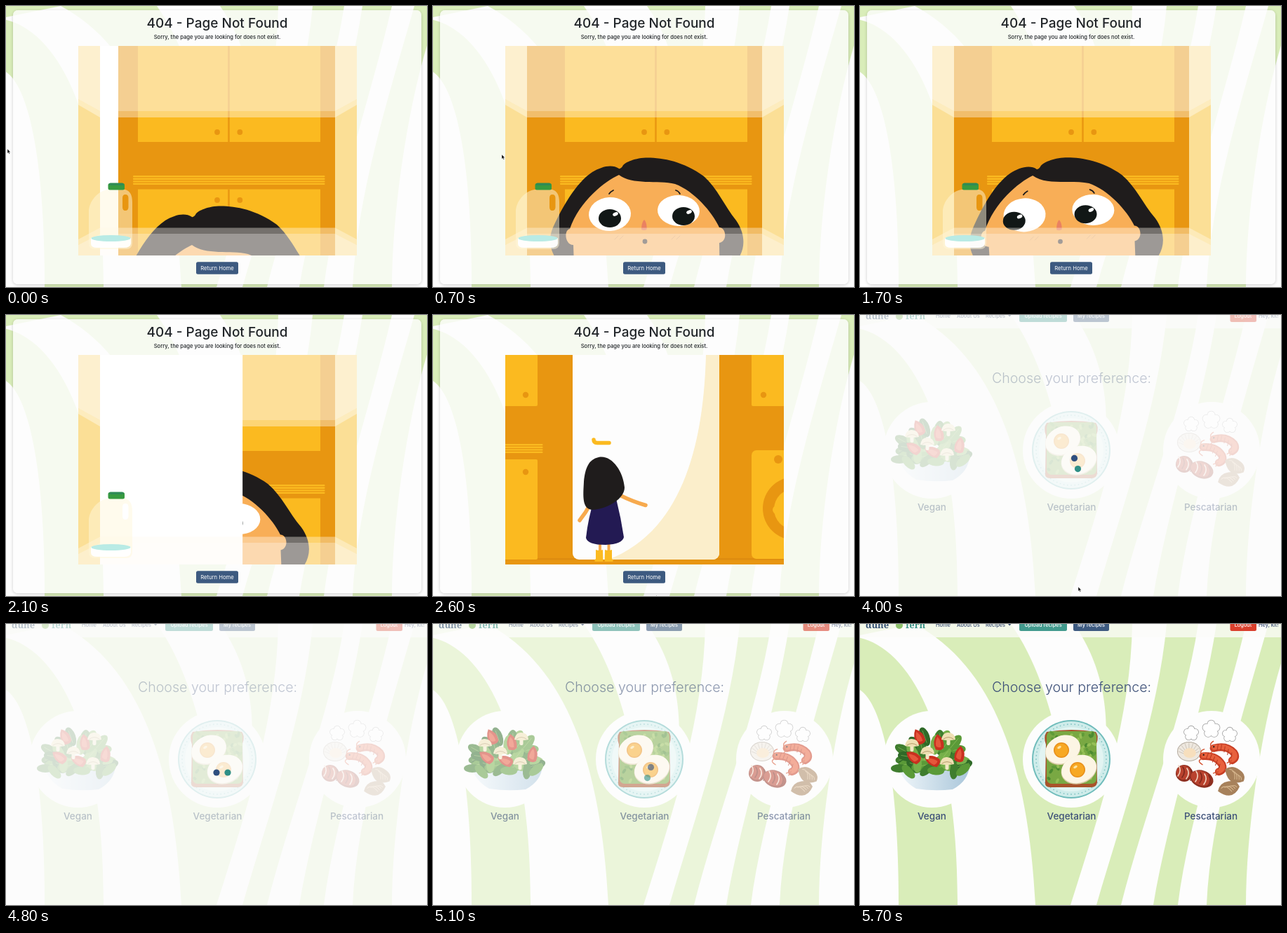
Recreate the animation shown at these times as an HTML page with a canvas. Size 600 by 401 pixels, loop 5.8 s.

```html
<!DOCTYPE html>
<html lang="en">
<head>
<meta charset="utf-8">
<title>404 - Page Not Found</title>
<style>
html, body { margin: 0; width: 100%; height: 100%; overflow: hidden; background: #fdfdfd; }
canvas, svg { position: absolute; left: 0; top: 0; width: 600px; height: 401px; }
text { font-family: Inter, "Open Sans", sans-serif; }
.mid { text-anchor: middle; }
.nav text { font-size: 7.4px; font-weight: 500; }
.nav .logo { font: 700 13px "Noto Serif", serif; }
</style>
</head>
<body>
<canvas id="stage" width="600" height="401"></canvas>
<svg viewBox="0 0 600 401">
  <g id="lost" fill="#212529" class="mid">
    <text x="301" y="31" font-size="19" font-weight="500">404 - Page Not Found</text>
    <text x="301" y="47.3" font-size="7.6" font-weight="500">Sorry, the page you are looking for does not exist.</text>
    <rect id="button" x="271" y="365.3" width="60" height="17.5" rx="2.5"/>
    <text x="301" y="376.8" font-size="7.7" fill="#fff">Return Home</text>
  </g>
  <g id="prefs" fill="#3d5078">
    <g class="nav">
      <text class="logo" x="8" y="6" fill="#334f73">dune</text>
      <circle cx="56" cy="2" r="5" fill="#8cbf6a"/>
      <text class="logo" x="65" y="6" fill="#3c9488">fern</text>
      <text x="108" y="4.3">Home</text>
      <text x="138" y="4.3">About Us</text>
      <text x="179" y="4.3">Recipes</text>
      <path d="M211 0h4.4l-2.2 2.4z"/>
      <rect x="227" y="-8" width="68" height="18" rx="2.5" fill="#429a8d"/>
      <rect x="304" y="-8" width="51" height="18" rx="2.5" fill="#3d5a80"/>
      <rect x="527.5" y="-8" width="37.5" height="18" rx="2.5" fill="#d93f2c"/>
      <g fill="#fff" class="mid">
        <text x="261" y="4.3">Upload recipes</text>
        <text x="329.5" y="4.3">My recipes</text>
        <text x="546" y="4.3">Logout</text>
      </g>
      <text x="568" y="4.3">Hey, kit!</text>
    </g>
    <g class="mid">
      <text x="301.5" y="97.3" font-size="19.6" font-weight="300">Choose your preference:</text>
      <g font-size="13.5" font-weight="500">
        <text x="102.5" y="279">Vegan</text>
        <text x="301.5" y="279">Vegetarian</text>
        <text x="500" y="279">Pescatarian</text>
      </g>
    </g>
  </g>
  <g id="cursor">
    <path id="arrow" d="M0 0V6.2L1.5 4.9 2.5 7.2 3.5 6.8 2.5 4.6H4.4Z" fill="#000" stroke="#fff" stroke-width=".4"/>
    <path id="hand" d="M-1 0Q0-1 1 0V3Q4 2.5 4.2 4.5 4.2 7 3 8H-1Q-2 6.5-3 5-2.5 4-1 5Z" fill="#fff" stroke="#222" stroke-width=".8"/>
  </g>
</svg>
<script>
const LOOP = 5800, STEP = 100;
const KITCHEN_END = 2300, LEAVE = 3900;
const ORANGE = '#e89611', YELLOW = '#fbba20', SKIN = '#f8ae57', BLACK = '#1f1c1c', GREEN = '#d9edb9', WHITE = '#fdfdfd';
const c = document.getElementById('stage').getContext('2d');
const $ = id => document.getElementById(id);

const clamp = v => Math.max(0, Math.min(1, v));
const ramp = (t, a, b) => clamp((t - a) / (b - a));
const smooth = (t, a, b) => { const k = ramp(t, a, b); return k * k * (3 - 2 * k); };
const mix = (a, b, k) => a + (b - a) * k;
const mixAll = (a, b, k) => a.map((v, i) => mix(v, b[i], k));

function rect(x, y, w, h, color, r = 0) {
  c.fillStyle = color;
  c.beginPath(); c.roundRect(x, y, w, h, r); c.fill();
}
function oval(x, y, rx, ry, color, turn = 0) {
  c.fillStyle = color;
  c.beginPath(); c.ellipse(x, y, rx, ry, turn, 0, 7); c.fill();
}
const dot = (x, y, r, color) => oval(x, y, r, r, color);
function shape(d, color) { c.fillStyle = color; c.fill(new Path2D(d)); }
function line(d, color, w) {
  c.strokeStyle = color; c.lineWidth = w; c.lineCap = c.lineJoin = 'round';
  c.stroke(new Path2D(d));
}
function seeded(seed) {
  return () => (seed = (seed * 16807) % 2147483647) / 2147483647;
}

// Each edge is one cubic curve; white stripes lie between pairs of edges.
const EDGES = [
  [-10, 90, -10, 200, -10, 300, -10, 401],
  [-10, 90, 25, 95, 55, 190, 55, 401],
  [-10, 18, 60, 25, 140, 130, 139, 401],
  [78, 0, 190, 60, 240, 200, 250, 401],
  [215, 0, 250, 50, 270, 110, 290, 200],
  [305, 0, 340, 50, 362, 120, 345, 215],
  [388, 0, 386, 130, 345, 260, 300, 401],
  [437, 0, 425, 130, 375, 270, 337, 401],
  [482, 0, 462, 130, 405, 270, 372, 401],
  [508, 0, 488, 130, 440, 270, 418, 401],
  [550, 0, 520, 130, 470, 270, 453, 401],
  [582, 0, 545, 130, 500, 270, 494, 401],
  [612, 20, 575, 120, 550, 290, 550, 401],
  [640, 20, 640, 120, 640, 290, 640, 401]
];
function stripes() {
  rect(0, 0, 600, 401, GREEN);
  for (let i = 0; i < EDGES.length; i += 2) {
    const a = EDGES[i], b = EDGES[i + 1];
    c.fillStyle = WHITE;
    c.beginPath();
    c.moveTo(a[0], a[1]);
    c.bezierCurveTo(...a.slice(2));
    c.lineTo(b[6], b[7]);
    c.bezierCurveTo(b[4], b[5], b[2], b[3], b[0], b[1]);
    c.fill();
  }
}

function counter(x, y, w) {
  for (let i = 0; i < 4; i++) rect(x, y + i * 3.6, w, 2.3, YELLOW, 1);
}

function head(t) {
  const k = 1 - (1 - ramp(t, 0, 600)) ** 2, look = smooth(t, 900, 1400);
  c.save();
  c.translate(-10 * look, 69 * (1 - k));
  c.translate(300, 356); c.rotate(-0.025 * look); c.translate(-300, -356);
  shape('M265 232C255 225 240 229 227 237C203 253 184 288 171 316C163 335 168 350 176 362V480H434V362C446 345 445 325 432 306C415 285 406 261 386 243C356 221 325 216 303 216.500C285 217.500 272 224 270 229Q267 233 265 232Z', BLACK);
  c.translate(-6 * look, 31 * (1 - k));
  shape('M265 241C245 250 209 278 195 318C186 320 188 341 200 341L205 480H410L408 338C420 336 418 316 408 316C398 294 372 264 345 254C320 248 284 256 265 241Z', SKIN);
  oval(252, 297, 30, 24, '#fff', -0.05);
  oval(350, 292, 30, 22, '#fff', 0.05);
  const left = [252 - 15 * look, 303 + 2 * look], right = [357 - 18 * look, 300 - 2 * look];
  for (const [x, y] of [left, right]) {
    oval(x, y, 16, 13, '#111716');
    oval(x + 8, y - 6, 4, 2.5, '#fff', -0.4);
  }
  line('M251 268Q253 265 257 263', BLACK, 1.8);
  line('M346 263Q350 264 352 268', BLACK, 1.8);
  shape('M301 305C304 308 305 314 304.500 319Q301 321 297 319C297 314 298 308 301 305Z', '#ea8161');
  dot(302, 336, 3.4, '#2c2321');
  line('M259 333L264 328M266 333L271 328M340 333L345 328M347 333L352 328', '#d08a4a', 0.8);
  c.restore();
}

function jug() {
  c.fillStyle = 'rgba(255,247,220,.5)';
  c.fill(new Path2D('M145 262H170C177 264 180 270 180 280V338Q180 347 171 347H127Q118 347 118 338V292C119 278 131 264 145 262ZM170 269Q166 269 166 274V287Q166 292 170 292 174.500 292 174.500 287V274Q174.500 269 170 269Z'), 'evenodd');
  shape('M121 331H178V339Q177 345 168 345H130Q121 345 121 339Z', 'rgba(255,255,255,.95)');
  oval(149.500, 331.500, 28, 4.6, '#b9ebe5');
}
function cap() {
  rect(145.500, 253, 23.5, 9.5, '#379a40', 2.5);
  rect(147, 252.5, 20.5, 3.5, '#2f8b55', 2);
}

function inside(t) {
  rect(103, 57, 397, 299, '#fbdf96');
  rect(134, 57, 335, 299, ORANGE);
  rect(188, 57, 260, 137, YELLOW);
  counter(181, 242, 273.5);
  rect(188, 261.5, 260, 95, YELLOW);
  for (const [y, h] of [[57, 137], [261.5, 95]]) rect(316.3, y, 2.4, h, ORANGE);
  for (const y of [180, 277]) { dot(301, y, 3.9, ORANGE); dot(333.3, y, 3.9, ORANGE); }
  c.save();
  c.beginPath(); c.rect(134, 57, 335, 299); c.clip();
  head(t);
  c.restore();
  const door = t < 1000 ? 26 * (1 - ramp(t, 0, 200)) : 335 * smooth(t, 1900, 2250);
  if (door > 0) rect(134, 57, door, 299, '#fff');
  shape('M103 57H500V133L469 150H134L103 133Z', 'rgba(255,255,255,.54)');
  shape('M103 133L134 150H469L500 133V141L469 159H134L103 141Z', 'rgba(255,255,255,.38)');
  shape('M134 316.500H469L500 333V341L469 325H134L103 341V333Z', 'rgba(255,250,240,.38)');
  shape('M134 325H469L500 341V356H103V341Z', 'rgba(255,252,246,.56)');
  jug();
  cap();
}

// Closed outline of four cubic curves given as 26 numbers.
function blob(p, color) {
  c.fillStyle = color;
  c.beginPath(); c.moveTo(p[0], p[1]);
  for (let i = 2; i < p.length; i += 6) c.bezierCurveTo(...p.slice(i, i + 6));
  c.fill();
}
function arm(p, w) {
  line(`M${p[0]} ${p[1]}Q${p[2]} ${p[3]} ${p[4]} ${p[5]}`, '#f7aa4e', w);
}
const HAIR_DOWN = [236, 203, 254, 199, 271, 222, 273, 246, 273, 262, 250, 276, 228, 278, 212, 278, 214, 258, 215, 238, 217, 218, 222, 206, 236, 203];
const HAIR_UP = [226, 205, 245, 204, 257, 220, 255, 240, 255, 260, 235, 279, 212, 278.5, 192, 276, 184, 262, 187, 248, 190, 232, 202, 208, 226, 205];

function girl(t) {
  const k = smooth(t, 2750, 3250);
  const drop = 5 * k;
  rect(236, 326, 4, 12, '#f7aa4e');
  rect(248.5, 326, 4, 12, '#f7aa4e');
  const boots = 'M232 335Q237 337 242 335L242.500 352H231Q229 350 232 348Z';
  c.save(); c.translate(k, drop * 0.5);
  shape(boots, YELLOW);
  c.translate(487, 0); c.scale(-1, 1);
  shape(boots, YELLOW);
  c.restore();
  arm(mixAll([224, 270, 218, 282, 209, 293], [240, 275, 239, 280, 238, 285], k), 5.5);
  const top = mix(230, 240, k), right = mix(261, 262, k);
  shape(`M${top} 262L${right} 262Q268 290 ${272 + k} ${317 + drop}Q${270 + k} ${327 + drop} 246 ${328 + drop}Q${220 + k} ${328 + drop} ${218 + k} ${318 + drop}Q221 290 ${top} 262Z`, '#231a53');
  arm(mixAll([266, 257, 284, 266, 303, 271.5], [257, 262, 264, 230, 250, 189], k), mix(5.5, 7.5, k));
  blob(mixAll(HAIR_DOWN, HAIR_UP, k), BLACK);
  return k;
}

function outside(t) {
  rect(103, 57, 397, 299, ORANGE);
  rect(103, 347, 397, 2.5, '#de8c10');
  rect(100, 50, 49, 80, YELLOW, 2);
  rect(454, 50, 60, 80, YELLOW, 2);
  counter(100, 184, 56.5);
  rect(100, 206, 49, 143, YELLOW, 2);
  for (const [x, y] of [[132, 114], [132, 224], [471, 114]]) dot(x, y, 4.2, ORANGE);
  rect(454, 193, 60, 155, YELLOW, 7);
  dot(492, 206, 6, ORANGE);
  dot(515, 276, 45, ORANGE);
  dot(515, 277, 29, YELLOW);
  dot(490, 278, 6, YELLOW);
  c.save();
  c.beginPath(); c.roundRect(199, 40, 209, 309, 9); c.clip();
  rect(199, 57, 209, 292, WHITE);
  shape('M389 57C386 170 362 306 250 349H408V57Z', '#fbeecb');
  c.restore();
  const k = girl(t);
  line(`M229 ${178 + k}Q229 ${182.3 + k} 234 ${182.5 + k}L${251 - k} ${182.5 + 4 * k}`, YELLOW, 5.5);
}

function card() {
  c.save();
  c.beginPath(); c.rect(0, 0, 600, 401); c.roundRect(10, 6, 582, 391, 7);
  c.clip('evenodd');
  c.shadowColor = 'rgba(0,0,0,.2)'; c.shadowBlur = 4; c.shadowOffsetY = 1;
  rect(10, 6, 582, 391, WHITE, 7);
  c.restore();
  rect(10, 6, 582, 391, 'rgba(254,254,254,.8)', 7);
}

function lostPage(t) {
  stripes();
  card();
  c.save();
  c.beginPath(); c.rect(103, 57, 397, 299); c.clip();
  (t < KITCHEN_END ? inside : outside)(t);
  c.restore();
}

function salad() {
  const rnd = seeded(41);
  const greens = ['#3f7d2e', '#5a9a38', '#76b04a', '#2f6a28'];
  const bowl = c.createLinearGradient(57, 0, 156, 0);
  bowl.addColorStop(0, '#eef5f9'); bowl.addColorStop(1, '#a9c6da');
  shape('M55 203Q105 214 156 201Q155 224 132 236Q106 239 80 235Q59 223 55 203Z', bowl);
  for (let i = 0; i < 38; i++) {
    const a = Math.PI * (1 + rnd()), r = 0.25 + 0.7 * rnd();
    const x = 101 + 52 * r * Math.cos(a), y = 204 + 50 * r * Math.sin(a), turn = a + rnd() - 0.5;
    oval(x, y, 14, 7, greens[i % 4], turn);
    line(`M${x - 9 * Math.cos(turn)} ${y - 9 * Math.sin(turn)}L${x + 9 * Math.cos(turn)} ${y + 9 * Math.sin(turn)}`, 'rgba(170,210,110,.7)', 0.7);
  }
  for (let i = 0; i < 8; i++) oval(56 + i * 13, 206 + 6 * Math.sin(i * 2.2), 12, 6, greens[i % 3], i * 0.8);
  for (const [x, y, r] of [[84, 161, 1.2], [76, 190, 0.7], [112, 169, 1.5], [142, 186, 1.8], [103, 195, 0.5]]) {
    c.save(); c.translate(x, y); c.rotate(r);
    shape('M-12 1Q-5 -9 8 -7Q13 -3 10 5Q-2 10 -12 1Z', '#c9301f');
    shape('M-8 1Q-2 -4 7 -3Q8 1 5 4Q-2 5 -8 1Z', '#e4573b');
    c.restore();
  }
  for (const [x, y] of [[74, 172], [96, 183], [126, 163], [124, 198]]) {
    rect(x - 2.5, y, 5, 10, '#f3e8c4', 2);
    shape(`M${x - 10} ${y + 2}Q${x - 8} ${y - 9} ${x} ${y - 8}Q${x + 9} ${y - 8} ${x + 10} ${y + 2}Q${x} ${y + 4} ${x - 10} ${y + 2}Z`, '#efe0b3');
    line(`M${x - 7} ${y + 1}Q${x} ${y - 4} ${x + 7} ${y + 1}`, '#a58a57', 0.8);
  }
}

function toast() {
  dot(301, 193, 56, '#6fbcbb');
  dot(301, 193, 54, '#cfecea');
  for (let i = 0; i < 60; i++) {
    const a = i * Math.PI / 30;
    dot(301 + 50 * Math.cos(a), 193 + 50 * Math.sin(a), 0.9, '#85c5c5');
  }
  dot(301, 193, 46, '#e2f4f2');
  shape('M266 154Q302 148 336 154Q341 160 337 171L338 226Q337 233 330 233H271Q263 233 264 226L265 172Q261 161 266 154Z', '#a9532b');
  rect(266, 153, 71, 75, '#79a843', 7);
  const rnd = seeded(7);
  for (let i = 0; i < 75; i++) {
    oval(269 + 65 * rnd(), 156 + 70 * rnd(), 2 + 3 * rnd(), 2, ['#4c8a31', '#95bf56', '#5f9b38'][i % 3], 3 * rnd());
  }
  for (const [x, y, turn] of [[289, 179, -0.4], [312, 207, -0.35]]) {
    oval(x, y + 1, 26, 20, '#d8c9a2', turn);
    oval(x, y, 25.5, 19.5, '#fcf5e4', turn);
    dot(x - 2, y + 1, 11, '#e8901b');
    dot(x - 2, y + 1, 9.4, '#f7a823');
    oval(x - 5, y - 3, 3, 1.8, '#fde3a0', -0.5);
  }
}

function shrimp(x, y, turn) {
  c.save(); c.translate(x, y); c.rotate(turn);
  line('M-14 -3Q4 -9 15 2Q20 9 13 13', '#c93f25', 11);
  line('M-14 -4Q4 -9 15 2Q19 8 13 12', '#e8613d', 7);
  for (let i = 0; i < 5; i++) line(`M${-8 + i * 5} ${-9 + i * i * 0.7}l-1 8`, '#b5371f', 1);
  line('M-16 -2Q-22 -9 -15 -13M-15 1Q-22 6 -12 9M12 13l-6 4M12 13l-2 6', '#d4512f', 1.4);
  dot(-14, -5, 1.2, '#2b1a18');
  c.restore();
}
function seafood() {
  for (const [x, y, r] of [[472, 156, 7.5], [500.500, 150, 9], [527, 158, 7.5]]) {
    for (const [color, grow] of [['#9d9d9d', 0.8], ['#fff', 0]])
      for (let i = 0; i < 5; i++) {
        const a = i * 1.2566 - 1.57;
        dot(x + r * 0.8 * Math.cos(a), y + r * 0.8 * Math.sin(a), r * 0.58 + grow, color);
      }
    dot(x, y, r * 0.7, '#fff');
  }
  oval(469, 182, 17, 14, '#b5aca0');
  oval(469, 182, 16, 13, '#eee8df');
  for (let i = 0; i < 9; i++) {
    const a = Math.PI + i * 0.39;
    line(`M469 188L${469 + 15 * Math.cos(a)} ${182 + 12 * Math.sin(a)}`, '#c5bbb0', 0.8);
  }
  oval(470, 184, 9, 7, '#f7dfbd');
  shrimp(518, 181, 0.05);
  shrimp(502, 195, 0.25);
  for (const [x, y, w] of [[462, 213, 12], [487, 221, 17]]) {
    oval(x, y, w, 12, '#8e2f20', 0.35);
    oval(x - 1, y - 1, w - 2, 10, '#b9422e', 0.35);
    for (let i = -1; i < 3; i++) line(`M${x + i * 6 - 2} ${y - 9 + i * 2}q5 7 -1 15`, i % 2 ? '#f2d6c3' : '#7c281c', 1.6);
  }
  for (const [x, y, turn] of [[534, 216, 0.4], [526, 235, -0.4]]) {
    c.save(); c.translate(x, y); c.rotate(turn);
    shape('M-16 -3Q-9 -13 3 -10Q15 -8 15 3Q6 12 -4 9Q-11 6 -16 -3Z', '#a7815b');
    for (let i = 0; i < 4; i++) line(`M${-10 + i * 5} ${-5 + i}Q${-2 + i * 4} ${-8 + i * 2} ${2 + i * 3} ${5 - i}`, '#d6b68e', 1.1);
    c.restore();
  }
}

function prefsPage(t, veil) {
  stripes();
  rect(0, 0, 600, 19, 'rgba(253,253,250,.74)');
  for (const x of [102.5, 301, 501]) dot(x, 193, 69, WHITE);
  salad(); toast(); seafood();
  if (!veil) return;
  rect(0, 0, 600, 401, `rgba(253,253,253,${veil})`);
  const a = (t - 4800) / 1000 * Math.PI * 2;
  c.globalAlpha = clamp(veil / 0.8);
  for (const [side, color] of [[-1, '#2f4f7f'], [1, '#2f8f86']])
    dot(308 + side * 8 * Math.cos(a), 212 + side * 8 * Math.sin(a), 4.6, color);
  c.globalAlpha = 1;
}

const PATH = [[0, 2, 204], [700, 98, 212], [1500, 330, 420], [2300, 320, 408], [2600, 318, 400], [3000, 310, 375], [3900, 310, 375], [4200, 314, 425], [LOOP, 314, 425]];
function pointer(t) {
  const i = PATH.findIndex(p => p[0] > t), a = PATH[i - 1], b = PATH[i];
  const k = smooth(t, a[0], b[0]);
  return [mix(a[1], b[1], k), mix(a[2], b[2], k)];
}

function draw(t) {
  const first = t < LEAVE;
  const veil = first ? 0 : 0.8 * (1 - smooth(t, 4800, 5500));
  if (first) lostPage(t); else prefsPage(t, veil);
  const [x, y] = pointer(t);
  const over = first && x > 271 && x < 331 && y > 365 && y < 383;
  $('lost').style.display = first ? '' : 'none';
  $('prefs').style.display = first ? 'none' : '';
  $('prefs').style.opacity = 1 - veil * 0.85;
  $('button').setAttribute('fill', over ? '#344d6d' : '#3d5a80');
  $('cursor').setAttribute('transform', `translate(${x} ${y})`);
  $('arrow').style.display = over ? 'none' : '';
  $('hand').style.display = over ? '' : 'none';
}

const start = performance.now();
function tick() {
  const t = (performance.now() - start) % LOOP;
  draw(Math.floor(t / STEP) * STEP);
  requestAnimationFrame(tick);
}
tick();
</script>
</body>
</html>
```
